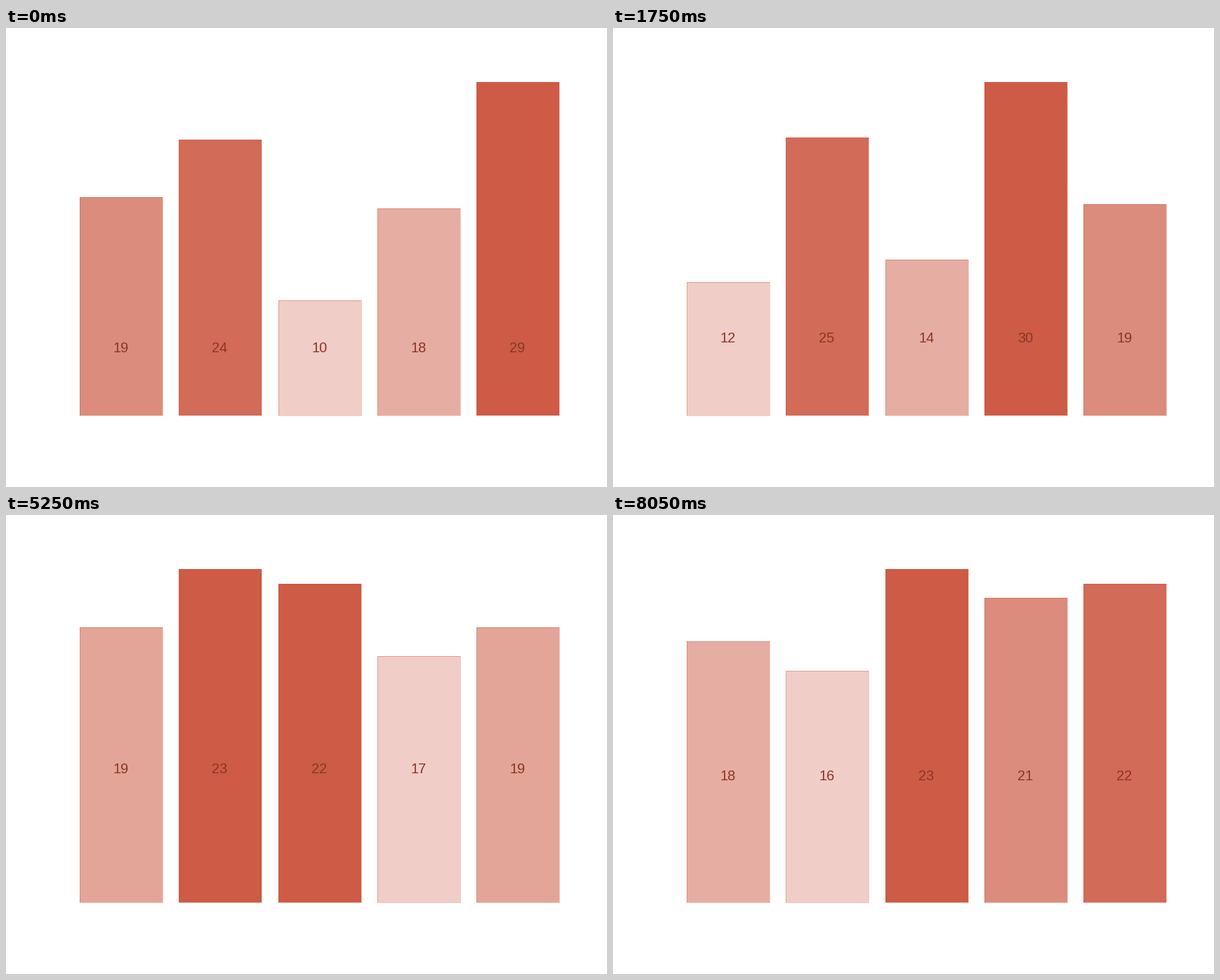
Recreate the animation shown at these times as a matplotlib script. Size 856 by 654 pixels, loop 8.75 s.

```python
import matplotlib.pyplot as plt
from matplotlib.animation import FuncAnimation
from matplotlib.colors import to_rgb
from matplotlib.patches import Rectangle

W, H, DPI = 856, 654, 100
BASE, FULL = 552, 475
LEFT, RIGHT, PITCH = 105, 223, 141.35
FONT_PX = 20

PALE, ROSE, SALMON, BRICK, CORAL = "#f0cdc7", "#e6ada2", "#db8c7c", "#d26b58", "#cd5b45"
BLUSH = "#e3a598"
INK = "#8b3626"
FIVE = [PALE, ROSE, SALMON, BRICK, CORAL]
THREE = [PALE, BLUSH, CORAL]

SAMPLES = [
    (19, 24, 10, 18, 29),
    (12, 25, 14, 30, 19),
    (21, 20, 22, 20, 17),
    (19, 23, 22, 17, 19),
    (18, 16, 23, 21, 22),
]

fig = plt.figure(figsize=(W / DPI, H / DPI), dpi=DPI, facecolor="white")
ax = fig.add_axes([0, 0, 1, 1])
ax.set_xlim(0, W)
ax.set_ylim(H, 0)
ax.axis("off")


def mix(a, b, t):
    return tuple(p + (q - p) * t for p, q in zip(to_rgb(a), to_rgb(b)))


def block(color, z):
    return ax.add_patch(Rectangle((0, 0), 1, 1, fc=color, lw=0, antialiased=False, zorder=z))


def place(patch, x0, y0, x1, y1):
    patch.set_bounds(x0, y0, x1 - x0, y1 - y0)


class Bar:
    def __init__(self, i):
        self.x0 = round(LEFT + PITCH * i - 0.1)
        self.x1 = round(RIGHT + PITCH * i + 0.1)
        self.rim = block(PALE, 1)
        self.edge = block(CORAL, 2)
        self.fill = block(CORAL, 3)
        self.label = ax.text((self.x0 + self.x1) / 2 - 0.5, 0, "", color=INK,
                             family="Liberation Sans", size=FONT_PX * 72 / DPI,
                             ha="center", va="baseline", zorder=4)

    def show(self, value, top, baseline, color):
        place(self.rim, self.x0, top, self.x1 + 1, BASE + 1)
        place(self.edge, self.x0, top, self.x1, BASE)
        place(self.fill, self.x0 + 1, top + 1, self.x1, BASE)
        self.edge.set_facecolor(mix(color, CORAL, 0.4))
        self.fill.set_facecolor(color)
        self.label.set_text(str(value))
        self.label.set_y(baseline)


bars = [Bar(i) for i in range(5)]


def shade(values):
    """Colour by rank; samples with ties use the three-step scale."""
    ranks = sorted(set(values))
    if len(ranks) == len(values):
        return [FIVE[ranks.index(v)] for v in values]
    return [THREE[min(ranks.index(v), 2)] for v in values]


def draw(n):
    values = SAMPLES[n % len(SAMPLES)]
    unit = FULL / max(values)
    baseline = round(BASE - min(values) * unit / 2 - 8.5)
    for bar, v, color in zip(bars, values, shade(values)):
        bar.show(v, round(BASE - v * unit), baseline, color)
    return []


anim = FuncAnimation(fig, draw, frames=len(SAMPLES), interval=1750,
                     repeat=True, repeat_delay=0, blit=False)
plt.show()
```
